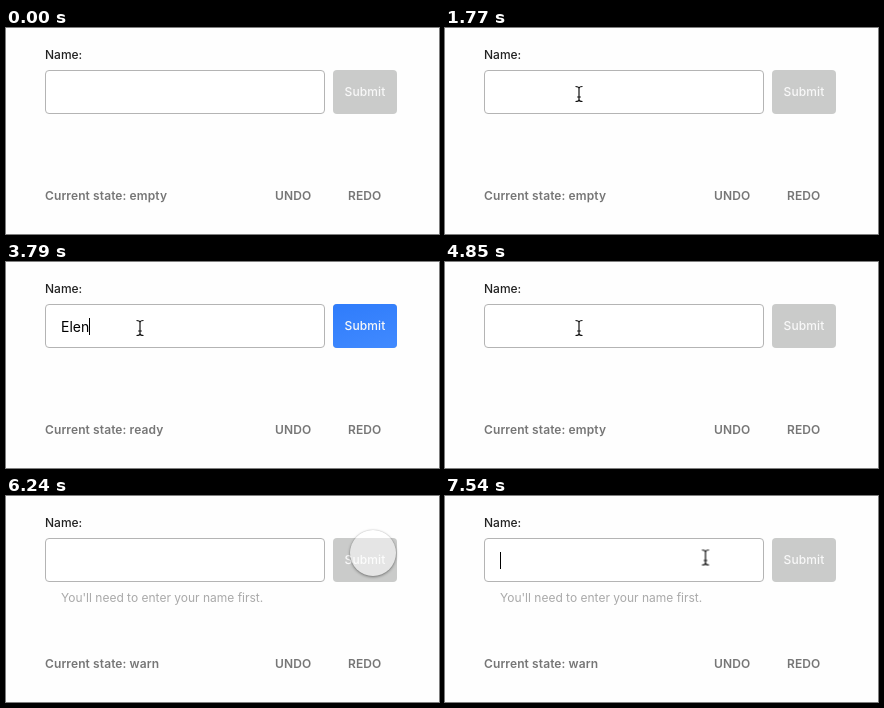
Write an HTML page that moves like this. It is 433 by 206 pixels and loops after 8000 ms.

```html
<!DOCTYPE html>
<html lang="en">
<head>
<meta charset="utf-8">
<title>Name form</title>
<style>
html, body { margin: 0; width: 100%; height: 100%; overflow: hidden; background: #fefefe; }
body { position: relative; font: 500 12px/15px Inter, "Open Sans", sans-serif; white-space: nowrap; }
body * { box-sizing: border-box; }
.at { position: absolute; }
.label { left: 39px; top: 19px; color: #222; }

.field {
  left: 39px; top: 42px; width: 280px; height: 44px;
  border: 1px solid #b4b4b4; border-radius: 4px; background: #fff;
}
.value { left: 55px; top: 56px; height: 17px; font: 400 14px/17px Inter, sans-serif; color: #000; display: flex; }
.value span { animation: 8s step-end infinite; font-size: 0; }
.value span:nth-child(1) { animation-name: key1; }
.value span:nth-child(2) { animation-name: key2; }
.value span:nth-child(3) { animation-name: key3; }
.value span:nth-child(4) { animation-name: key4; }
.value span:nth-child(5) { animation-name: key5; }
.value i { width: 1px; height: 17px; background: #000; animation: blink 8s step-end infinite; }

.button {
  left: 327px; top: 42px; width: 64px; height: 44px; border-radius: 4px; overflow: hidden;
  background: #cacbca; color: #f8f8f8; text-align: center; line-height: 15px; padding-top: 14px;
  letter-spacing: .1px;
}
.button b { inset: 0; background: linear-gradient(165deg, #2f7cfb, #418aff); animation: enable 8s linear infinite; }
.button span { position: relative; }

.hint { left: 55px; top: 94px; font-weight: 400; color: #a9a9a9; animation: hint 8s linear infinite; }

.status { top: 160px; font-weight: 600; color: #767676; letter-spacing: .1px; }
.word { position: absolute; left: 100%; top: 0; animation: 8s step-end infinite; }
.empty { animation-name: empty; }
.ready { animation-name: ready; }
.warn { animation-name: warn; }

.pointer { left: 0; top: 0; width: 0; height: 0; animation: move 8s linear infinite; }
.touch { left: -23px; top: -23px; width: 46px; height: 46px; animation: touch 8s step-end infinite; }
.touch div {
  width: 100%; height: 100%; border-radius: 50%; background: rgba(255, 255, 255, .5);
  box-shadow: 0 1px 3px rgba(0, 0, 0, .42), 0 0 1px rgba(0, 0, 0, .3);
  animation: press 8s linear infinite;
}
.beam { left: -8px; top: -10px; width: 16px; height: 20px; animation: beam 8s step-end infinite; }
.beam path { fill: none; stroke: #111; stroke-width: 1.2; }
.beam .halo { stroke: #fff; stroke-width: 3; }

/* typing, then deleting */
@keyframes key1 { 25.8%, 54.65% { font-size: 0 } 25.8% { font-size: 14px } }
@keyframes key2 { 27.2% { font-size: 14px } 52.4% { font-size: 0 } }
@keyframes key1 { 0% { font-size: 0 } 25.8% { font-size: 14px } 54.65%, 100% { font-size: 0 } }
@keyframes key2 { 0% { font-size: 0 } 27.2% { font-size: 14px } 52.4%, 100% { font-size: 0 } }
@keyframes key3 { 0% { font-size: 0 } 28.6% { font-size: 14px } 50.9%, 100% { font-size: 0 } }
@keyframes key4 { 0% { font-size: 0 } 29.8% { font-size: 14px } 48.65%, 100% { font-size: 0 } }
@keyframes key5 { 0% { font-size: 0 } 31.1% { font-size: 14px } 47.25%, 100% { font-size: 0 } }
@keyframes blink {
  0%, 22%, 37.65%, 60.5%, 72.8% { opacity: 0 }
  15.5%, 25.8%, 44.3%, 67.2%, 94.1%, 100% { opacity: 1 }
}

@keyframes enable { 0%, 25.8% { opacity: 0 } 27.2%, 54.5% { opacity: 1 } 55.4%, 100% { opacity: 0 } }
@keyframes hint { 0%, 75.6% { opacity: 0 } 77.8%, 100% { opacity: 1 } }
@keyframes empty { 0%, 54.65% { opacity: 1 } 25.8%, 75.65%, 100% { opacity: 0 } }
@keyframes ready { 0%, 54.65%, 100% { opacity: 0 } 25.8% { opacity: 1 } }
@keyframes warn { 0% { opacity: 0 } 75.65%, 100% { opacity: 1 } }

@keyframes move {
  0%, 7.5% { transform: translate(155px, 180px); animation-timing-function: ease-out }
  10.9% { transform: translate(155px, 90px) }
  14.1% { transform: translate(143px, 77px); animation-timing-function: ease-out }
  17.5%, 66.5% { transform: translate(134px, 66px) }
  67.5% { transform: translate(158px, 81px) }
  68% { transform: translate(190px, 95px) }
  68.6% { transform: translate(240px, 102px) }
  69.35% { transform: translate(292px, 87px) }
  69.8% { transform: translate(300px, 83px); animation-timing-function: ease-out }
  72.5%, 87% { transform: translate(367px, 57px); animation-timing-function: ease-in }
  88.75% { transform: translate(340px, 79px) }
  89.6% { transform: translate(318px, 80px); animation-timing-function: ease-out }
  92%, 100% { transform: translate(260.5px, 61.5px) }
}
@keyframes touch { 0%, 11%, 89.6%, 100% { opacity: 0 } 7.5%, 67.8% { opacity: 1 } }
@keyframes beam { 0%, 67.8% { opacity: 0 } 14.1%, 89.6%, 100% { opacity: 1 } }
@keyframes press { 0%, 72% { transform: none } 72.9%, 75.6% { transform: scale(.92) } 77.5%, 100% { transform: none } }
</style>
</head>
<body>
<div class="at label">Name:</div>
<div class="at field"></div>
<div class="at value"><span>E</span><span>l</span><span>e</span><span>n</span><span>a</span><i></i></div>
<div class="at button"><b class="at"></b><span>Submit</span></div>
<div class="at hint">You'll need to enter your name first.</div>
<div class="at status" style="left:39px">Current state:&nbsp;<span class="word empty">empty</span><span class="word ready">ready</span><span class="word warn">warn</span></div>
<div class="at status" style="left:269px">UNDO</div>
<div class="at status" style="left:342px">REDO</div>
<div class="at pointer">
  <div class="at touch"><div></div></div>
  <svg class="at beam" viewBox="-8 -10 16 20">
    <defs><path id="ibeam" d="M-3.5-7.5Q0-7.5 0-5.5Q0-7.5 3.5-7.5M0-5.5V5.5M-3.5 7.5Q0 7.5 0 5.5Q0 7.5 3.5 7.5M-1.8 3H1.8"/></defs>
    <path class="halo" d="M0-7V7"/>
    <use href="#ibeam"/>
  </svg>
</div>
</body>
</html>
```
